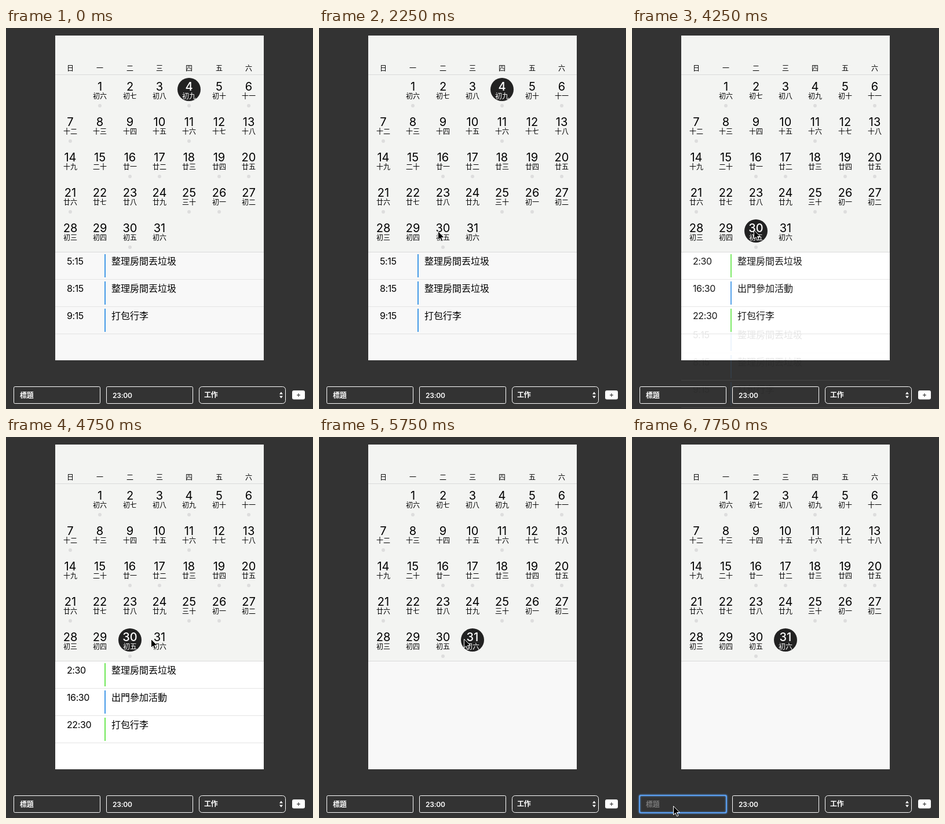
Animation, 530 px wide and 657 px high, one loop 8000 ms. Source, as an HTML page:

```html
<!DOCTYPE html>
<html lang="zh-Hant">
<head>
<meta charset="utf-8">
<title>月曆</title>
<style>
  html, body { margin: 0; width: 100%; height: 100%; overflow: hidden; background: #333; }
  svg { display: block; font-family: Inter, "Noto Sans CJK TC", "Noto Sans CJK", sans-serif; }
  .mid { text-anchor: middle; }
  .lunar, .week { font-size: 12px; }
  .num { font-size: 20px; }
  .row { font-size: 16px; }
  .time { letter-spacing: -.4px; }
  .day.on text { fill: #fff; font-weight: 500; }
  .day .disc { fill: none; }
  .day.on .disc { fill: #222; }
  .form { font-size: 12px; font-weight: 600; letter-spacing: -.2px; fill: #fff; }
  .box { fill: none; stroke: #fff; }
  #ring { fill: none; stroke: #5a9ff0; stroke-width: 2; filter: drop-shadow(0 0 1.5px #5a9ff0); }
</style>
</head>
<body>
<svg id="stage" width="530" height="657" viewBox="0 0 530 657">
  <rect width="530" height="657" fill="#333"/>
  <rect x="85" y="13" width="360" height="560" fill="#f3f4f2"/>
  <rect id="listBg" x="85" y="387" width="360" height="186"/>
  <path d="M85 80.5H445M85 386.5H445" stroke="#dadada"/>
  <g id="calendar"></g>
  <g id="lists"></g>
  <g class="form">
    <rect class="box" x="13.5" y="618.5" width="149" height="29" rx="2"/>
    <rect id="ring" x="13" y="618" width="150" height="30" rx="2"/>
    <text id="hint" x="24" y="638">標題</text>
    <rect class="box" x="173.5" y="618.5" width="149" height="29" rx="2"/>
    <text x="184" y="638">23:00</text>
    <rect class="box" x="333.5" y="618.5" width="149" height="29" rx="5"/>
    <text x="342" y="637">工作</text>
    <path d="M472 631.5l3-4 3 4zM472 634.5l3 4 3-4z"/>
    <rect x="494" y="625" width="22" height="15.5" rx="3"/>
    <path d="M502 633h6M505 630v6" stroke="#222"/>
  </g>
  <path id="cursor" d="M.5 .5V15.5L4 12.3L6.5 18L9 17L6.5 11.5H11.3Z" stroke="#fff" stroke-linejoin="round"/>
</svg>
<script>
const LOOP = 8000, STEP = 250, ROW = 47;
const PICK_30 = 4000, PICK_31 = 5250, FOCUS = 7000;
const $ = id => document.getElementById(id);

function add(parent, tag, attrs, text = '') {
  const node = document.createElementNS('http://www.w3.org/2000/svg', tag);
  for (const key in attrs) node.setAttribute(key, attrs[key]);
  node.textContent = text;
  return parent.appendChild(node);
}

const columnX = i => Math.round(85 + 360 / 7 * (i + .5));
const digits = '一二三四五六七八九';

// The lunar month turns over on the 26th.
function lunarName(day) {
  const n = (day + 4) % 30 + 1;
  if (n % 10 === 0) return '初二三'[n / 10 - 1] + '十';
  return '初十廿'[Math.floor(n / 10)] + digits[n % 10 - 1];
}

[...'日一二三四五六'].forEach((name, i) =>
  add($('calendar'), 'text', { class: 'week mid', x: columnX(i), y: 73.5 }, name));

const busyDays = [1, 4, 6, 7, 11, 16, 17, 19, 20, 21, 25, 26, 30];
const days = Array.from({ length: 31 }, (_, i) => {
  const day = i + 1, x = columnX(day % 7), y = 61 * Math.floor(day / 7);
  const cell = add($('calendar'), 'g', { class: 'day' });
  add(cell, 'circle', { class: 'disc', cx: x, cy: y + 106, r: 20 });
  add(cell, 'text', { class: 'num mid', x, y: y + 108 }, day);
  add(cell, 'text', { class: 'lunar mid', x, y: y + 121.5 }, lunarName(day));
  if (busyDays.includes(day)) add(cell, 'circle', { cx: x, cy: y + 134, r: 3, fill: '#ddd' });
  return cell;
});

const BLUE = '#4499e8', GREEN = '#6ee856';
function makeList(rows) {
  const list = add($('lists'), 'g', { class: 'row' });
  rows.forEach(([time, title, color], i) => {
    const row = add(list, 'g', { transform: `translate(0 ${ROW * i})` });
    add(row, 'text', { class: 'time', x: 105, y: 408 }, time);
    add(row, 'rect', { x: 170, y: 390, width: 2, height: 40, fill: color });
    add(row, 'text', { x: 182, y: 408 }, title);
    add(row, 'path', { d: 'M85 433.5H445', stroke: '#e4e4e4' });
  });
  return list;
}
const firstList = makeList([
  ['5:15', '整理房間丟垃圾', BLUE],
  ['8:15', '整理房間丟垃圾', BLUE],
  ['9:15', '打包行李', BLUE]]);
const secondList = makeList([
  ['2:30', '整理房間丟垃圾', GREEN],
  ['16:30', '出門參加活動', BLUE],
  ['22:30', '打包行李', GREEN]]);

// The pointer rests at each stop; a glide is the travel time before arrival.
const stops = [
  { time: 0, x: -50, y: -50 },
  { time: 250, x: 313, y: 282 },
  { time: 1250, x: 160, y: 478 },
  { time: 1750, x: 289, y: 354 },
  { time: 2250, x: 205, y: 350, glide: 500 },
  { time: 3250, x: 220, y: 350 },
  { time: 3750, x: 210, y: 348 },
  { time: 4750, x: 250, y: 348 },
  { time: 6250, x: 107, y: 546 },
  { time: 6750, x: 71, y: 632, glide: 500 },
  { time: FOCUS, x: 71, y: 636 }];

const ramp = (t, start, length) => Math.min(1, Math.max(0, (t - start) / length));

function pointerAt(t) {
  let { x, y } = stops[0];
  for (const stop of stops) {
    const { time, glide = 1 } = stop;
    const p = ramp(t, time - glide, glide);
    x += (stop.x - x) * p;
    y += (stop.y - y) * p;
  }
  return `translate(${Math.round(x)} ${Math.round(y)})`;
}

// List transitions are already under way on the tick that shows the click.
const swap = (t, click) => ramp(t, click - STEP, 555);

function render(now) {
  const t = Math.floor(now % LOOP / STEP) * STEP;
  const selected = t < PICK_30 ? 4 : t < PICK_31 ? 30 : 31;
  const enter = swap(t, PICK_30), leave = swap(t, PICK_31);

  days.forEach((cell, i) => cell.classList.toggle('on', i + 1 === selected));
  firstList.setAttribute('opacity', 1 - enter);
  firstList.setAttribute('transform', `translate(0 ${Math.round(3 * ROW * enter)})`);
  secondList.setAttribute('opacity', enter - leave);
  $('listBg').setAttribute('fill', t > PICK_30 && t < PICK_31 ? '#fff' : '#f8f8f8');

  $('hint').setAttribute('opacity', 1 - .66 * ramp(t, FOCUS, 750));
  $('ring').setAttribute('visibility', t >= FOCUS ? 'visible' : 'hidden');
  $('cursor').setAttribute('transform', pointerAt(t));
}

const start = performance.now();
function frame() {
  render(performance.now() - start);
  requestAnimationFrame(frame);
}
frame();
</script>
</body>
</html>
```
